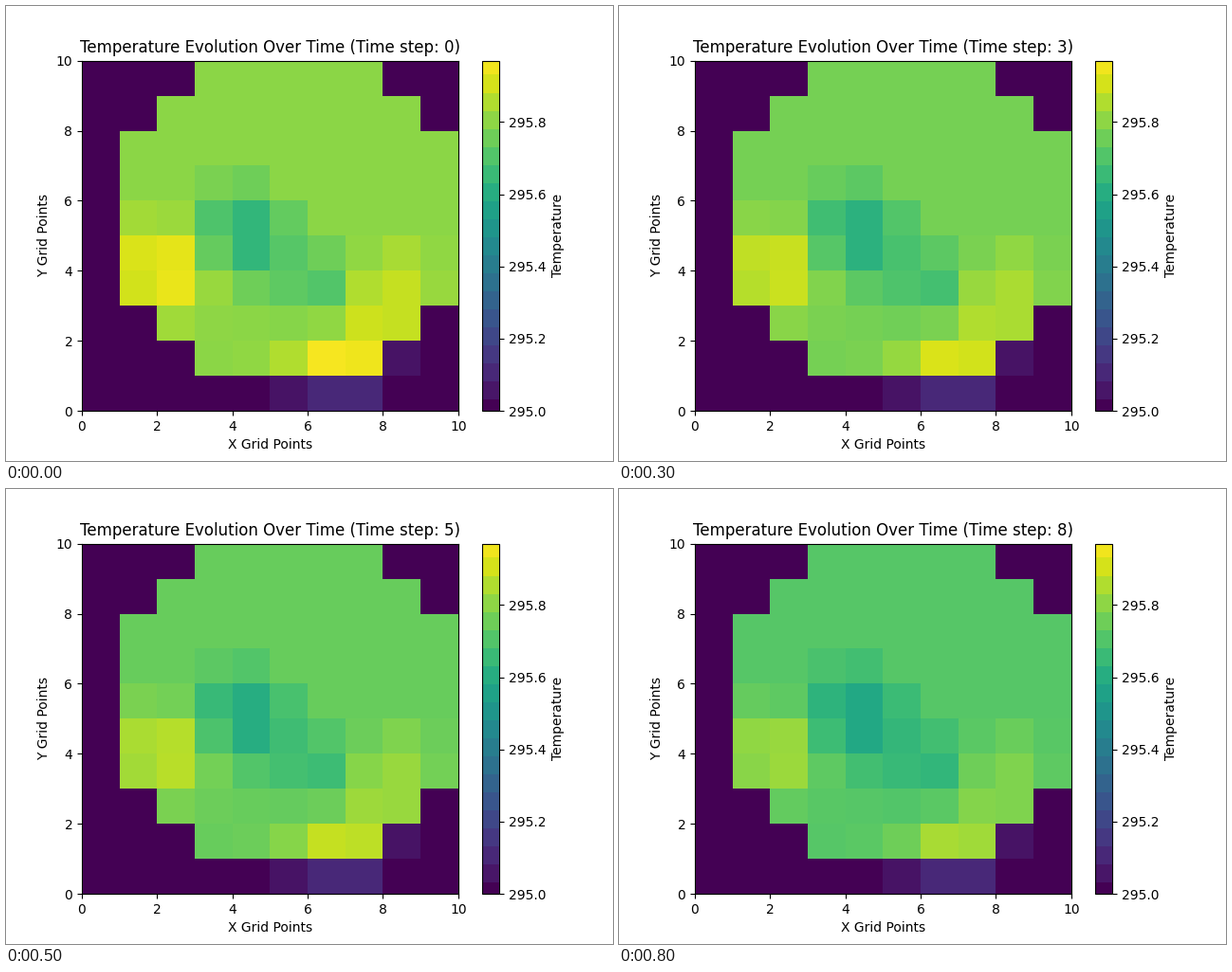
A matplotlib script that plays this animation: 640 by 480 pixels, repeating every 0.9 s.

```python
import matplotlib.pyplot as plt
import numpy as np
from matplotlib.animation import FuncAnimation
from matplotlib.cm import ScalarMappable
from matplotlib.colors import ListedColormap, Normalize

STEPS = 9
BASE, SPAN = 295.0, 0.97
BODY = 0.826
LEFT = [10, 5, 3, 1, 1, 1, 1, 1, 2, 3]    # first warm column, bottom row up
RIGHT = [10, 8, 9, 10, 10, 10, 10, 10, 9, 8]


def start_field():
    """Initial temperatures as a share of the colour range."""
    v = np.zeros((10, 10))
    for y, (a, b) in enumerate(zip(LEFT, RIGHT)):
        v[y, a:b] = BODY
    v[1, 3:8] = [BODY, 0.835, 0.88, 0.988, 0.974]
    v[2, 2:9] = [0.858, 0.832, BODY, 0.818, 0.835, 0.922, 0.912]
    v[3, 1:10] = [0.93, 0.965, 0.847, 0.778, 0.75, 0.73, 0.882, 0.912, 0.847]
    v[4, 1:10] = [0.945, 0.96, 0.765, 0.66, 0.738, 0.78, 0.835, 0.87, 0.833]
    v[5, 1:6] = [0.86, 0.848, 0.72, 0.66, 0.76]
    v[6, 3:5] = [0.8, 0.778]
    v[0, 5:8] = [0.05, 0.113, 0.113]
    v[1, 8] = 0.05
    return v


START = start_field()
DROP = np.where(START > 0.3, 0.18 * START - 0.058, 0) / (STEPS - 1)


def field(step):
    return BASE + SPAN * (START - DROP * step)


def banded(n=1024, first=0.0325, width=0.0515):
    """Viridis in flat bands, the lowest one narrower."""
    s = (np.arange(n) + 0.5) / n
    k = np.floor((s - first) / width)
    mid = np.where(k < 0, 0, first + (k + 0.5) * width)
    return ListedColormap(plt.get_cmap("viridis")(np.clip(mid, 0, 0.977)))


fig, ax = plt.subplots(figsize=(6.4, 4.8), dpi=100)
norm = Normalize(BASE, BASE + SPAN)
mesh = ax.pcolormesh(field(0), cmap="viridis", norm=norm)
fig.colorbar(ScalarMappable(norm, banded()), ax=ax, label="Temperature")
ax.set_xlabel("X Grid Points")
ax.set_ylabel("Y Grid Points")
title = ax.set_title("")


def update(step):
    mesh.set_array(field(step))
    title.set_text(f"Temperature Evolution Over Time (Time step: {step})")
    return mesh, title


anim = FuncAnimation(fig, update, frames=STEPS, interval=100, repeat=True,
                     repeat_delay=0, blit=False)
plt.show()
```
